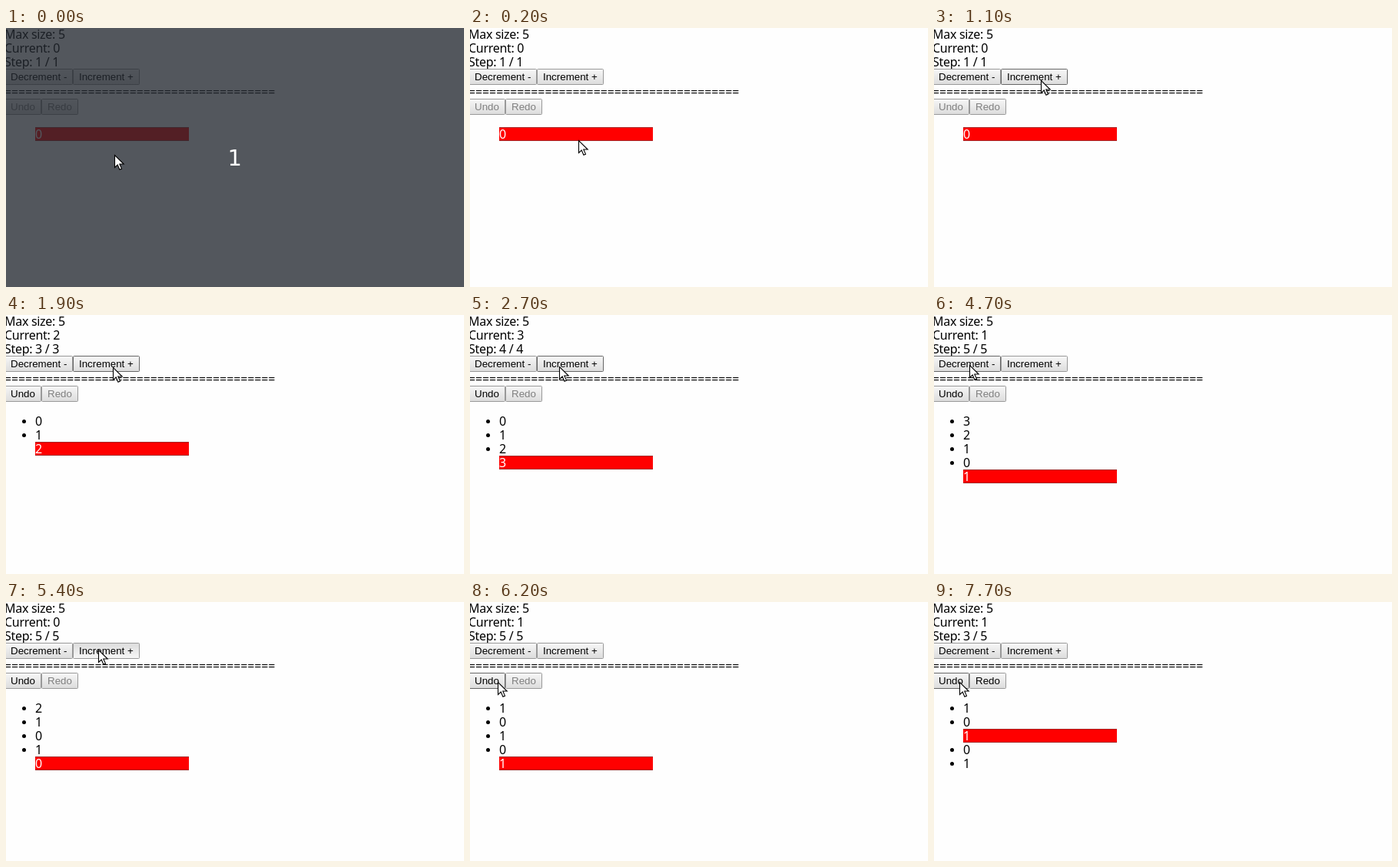
Write an HTML page that moves like this. It is 596 by 337 pixels and loops after 8000 ms.

```html
<!DOCTYPE html>
<html lang="en">
<head>
<meta charset="utf-8">
<title>Undo history counter</title>
<style>
  html, body { margin: 0; width: 100%; height: 100%; overflow: hidden; background: #fefefe; }
  svg { display: block; width: 596px; height: 337px; }
  text { font: 16px "Noto Sans", sans-serif; letter-spacing: -.3px; white-space: pre; }
  .rule { font-size: 15.8px; letter-spacing: 0; }
  .count { font: 29px "DejaVu Sans", sans-serif; fill: #fff; text-anchor: middle; }
  .button text { font: 13.333px "Liberation Sans", Arial, sans-serif; letter-spacing: 0; }
  .button rect { fill: url(#raised); stroke: #999; }
  .button.hover rect { stroke: #666; }
  .button.press rect { fill: url(#sunken); }
  .button.off text { fill: #808080; }
  .item rect, .item path, .current circle { fill: none; }
  .current rect { fill: #f00; }
  .current path { stroke: #a52626; }
  .current text { fill: #fff; }
</style>
</head>
<body>
<svg viewBox="0 0 596 337">
  <defs>
    <linearGradient id="raised" x2="0" y2="1">
      <stop stop-color="#f7f7f7"/><stop offset="1" stop-color="#dcdcdc"/>
    </linearGradient>
    <linearGradient id="sunken" x2="0" y2="1">
      <stop stop-color="#dcdcdc"/><stop offset="1" stop-color="#f7f7f7"/>
    </linearGradient>
  </defs>
  <text x="-2" y="14">Max size: 5</text>
  <text x="-2" y="32" id="value"></text>
  <text x="-2" y="50" id="step"></text>
  <text x="-2" y="89" class="rule" id="rule"></text>
  <g id="buttons"></g>
  <g id="list"></g>
  <g id="shade">
    <rect width="596" height="337" fill="rgba(35,40,48,.78)"/>
    <text x="297.5" y="179" class="count">1</text>
  </g>
  <path id="cursor" d="M.5 .6V16.4L4.2 13 6.9 19.2 9.5 18.1 6.8 12H12.2Z" fill="#fff" stroke="#000" stroke-width="1.1"/>
</svg>
<script>
const LOOP = 8000, FRAME = 100, SHADE_END = 200, MAX = 5, ROW = 18;
const $ = id => document.getElementById(id);

// Straight cursor glides, each starting where the last one ended.
const origin = { x: 141, y: 165 };
const glides = [
  { from: 100, to: 600, x: 139, y: 71 },
  { from: 900, to: 1100, x: 139, y: 68 },
  { from: 2600, to: 3000, x: 48, y: 62 },
  { from: 3400, to: 3500, x: 47, y: 60 },
  { from: 4000, to: 4200, x: 118, y: 60 },
  { from: 4500, to: 4700, x: 46, y: 65 },
  { from: 5000, to: 5400, x: 120, y: 62 },
  { from: 5700, to: 6200, x: 36, y: 104 },
  { from: 6800, to: 6900, x: 33, y: 104 }
];

// Clicks take effect on release; hold is how long the button looks pressed.
const clicks = [
  { at: 1500, act: add(1) },
  { at: 1900, act: add(1), hold: 200 },
  { at: 2600, act: add(1), hold: 200 },
  { at: 3400, act: add(-1) },
  { at: 3500, act: add(-1), hold: 100 },
  { at: 3900, act: add(-1), hold: 100 },
  { at: 4400, act: add(1) },
  { at: 5000, act: add(-1) },
  { at: 5600, act: add(1), hold: 200 },
  { at: 7300, act: undo, hold: 100 },
  { at: 7700, act: undo }
];

function add(delta) {
  return ({ history, index }) => {
    const next = [...history, history[index] + delta].slice(-MAX);
    return { history: next, index: next.length - 1 };
  };
}

function undo({ history, index }) {
  return { history, index: index - 1 };
}

const always = () => true;
const buttons = [
  { label: 'Decrement -', x: -2, y: 53, w: 89, enabled: always },
  { label: 'Increment +', x: 87, y: 53, w: 87, enabled: always },
  { label: 'Undo', x: -2, y: 92, w: 48, enabled: s => s.index > 0 },
  { label: 'Redo', x: 46, y: 92, w: 48, enabled: s => s.index < s.history.length - 1 }
];

$('rule').textContent = '='.repeat(39);
$('buttons').innerHTML = buttons.map(({ label, x, y, w }) =>
  `<g><rect x="${x + .5}" y="${y + .5}" width="${w - 1}" height="20" rx="1"/>
   <text x="${x + 8}" y="${y + 15}">${label}</text></g>`).join('');

const itemMarkup = (value, row, current) =>
  `<g class="item ${current ? 'current' : ''}" transform="translate(38 ${129 + ROW * row})">
    <rect width="200" height="${ROW}"/><path d="M0 .5H200M0 ${ROW - .5}H200"/>
    <circle cx="-14.5" cy="9.5" r="2.5"/><text y="15">${value}</text></g>`;

function cursorAt(time) {
  return glides.reduce((p, { from, to, x, y }) => {
    const k = Math.min(1, Math.max(0, (time - from) / (to - from)));
    return { x: p.x + (x - p.x) * k, y: p.y + (y - p.y) * k };
  }, origin);
}

function buttonClass(button, state, cursor, pressed) {
  if (!button.enabled(state)) return 'button off';
  const dx = cursor.x - button.x, dy = cursor.y - button.y;
  const over = dx >= 0 && dx < button.w && dy >= 0 && dy < 21;
  return 'button' + (over ? pressed ? ' press' : ' hover' : '');
}

function show(time) {
  const state = clicks.filter(c => c.at <= time)
    .reduce((s, c) => c.act(s), { history: [0], index: 0 });
  const { history, index } = state;
  const pressed = clicks.some(({ at, hold = 0 }) => time >= at - hold && time < at);
  const cursor = cursorAt(time);

  $('value').textContent = `Current: ${history[index]}`;
  $('step').textContent = `Step: ${index + 1} / ${history.length}`;
  $('list').innerHTML = history.map((value, row) => itemMarkup(value, row, row === index)).join('');
  buttons.forEach((button, i) =>
    $('buttons').children[i].setAttribute('class', buttonClass(button, state, cursor, pressed)));
  $('cursor').setAttribute('transform', `translate(${Math.round(cursor.x)} ${Math.round(cursor.y)})`);
  $('shade').style.display = time < SHADE_END ? '' : 'none';
}

const start = performance.now();
let shown;
function tick() {
  const elapsed = (performance.now() - start) % LOOP;
  const time = Math.floor(elapsed / FRAME) * FRAME;
  if (time !== shown) show(shown = time);
  requestAnimationFrame(tick);
}
tick();
</script>
</body>
</html>
```
